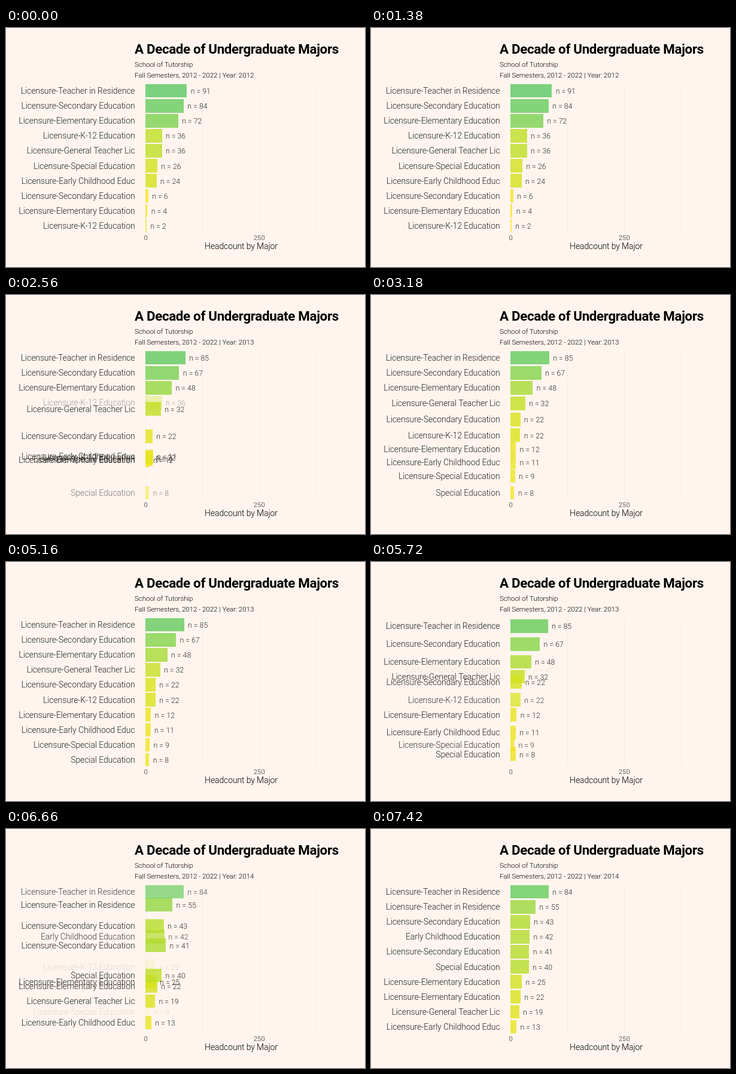
An HTML page with a canvas for the animation above (8 s loop, 600 by 400 pixels).

```html
<!DOCTYPE html>
<html lang="en">
<head>
<meta charset="utf-8">
<title>A Decade of Undergraduate Majors</title>
<style>
  html, body { margin: 0; width: 100%; height: 100%; overflow: hidden; background: #fff5ee; }
  canvas { display: block; }
</style>
</head>
<body>
<canvas id="stage" width="600" height="400"></canvas>
<script>
const ctx = document.getElementById('stage').getContext('2d');

const LOOP = 8000;
const MOVE = 2440;
const STARTS = [1265, 5025];
const YEARS = [2012, 2013, 2014];

// Each major: label, then [rank, headcount] per year, or null when it is not ranked.
const MAJORS = [
  ['Licensure-Teacher in Residence', [1, 91], [1, 85], [2, 55]],
  ['Licensure-Secondary Education', [2, 84], [2, 67], [5, 41]],
  ['Licensure-Elementary Education', [3, 72], [3, 48], [8, 22]],
  ['Licensure-K-12 Education', [4, 36], null, null],
  ['Licensure-General Teacher Lic', [5, 36], [4, 32], [9, 19]],
  ['Licensure-Special Education', [6, 26], [9, 9], null],
  ['Licensure-Early Childhood Educ', [7, 24], [8, 11], [10, 13]],
  ['Licensure-Secondary Education', [8, 6], [5, 22], [3, 43]],
  ['Licensure-Elementary Education', [9, 4], [7, 12], [7, 25]],
  ['Licensure-K-12 Education', [10, 2], [6, 22], null],
  ['Special Education', null, [10, 8], [6, 40]],
  ['Licensure-Teacher in Residence', null, null, [1, 84]],
  ['Early Childhood Education', null, null, [4, 42]],
];

// Yellow to green end of the viridis scale.
const COLORS = [
  [253, 231, 37], [220, 227, 25], [184, 222, 41],
  [149, 216, 64], [115, 208, 85], [85, 198, 103],
];

const lerp = (a, b, t) => a + (b - a) * t;
const clamp = (v, lo, hi) => Math.min(hi, Math.max(lo, v));
const easeCubic = t => t < 0.5 ? 4 * t ** 3 : 1 - 4 * (1 - t) ** 3;
const xOf = count => 233.35 + count * 0.758;
const yOf = rank => 105.15 + (rank - 1) * 25.1;

function colorOf(count) {
  const pos = clamp((count - 2) / 18.5, 0, 4.999);
  const i = Math.floor(pos);
  return `rgb(${COLORS[i].map((c, k) => Math.round(lerp(c, COLORS[i + 1][k], pos - i)))})`;
}

function text(string, x, y, { size, weight = 300, color = '#000', align = 'left', spacing = -0.12 }) {
  ctx.font = `${weight} ${size}px Roboto, "Liberation Sans", sans-serif`;
  ctx.letterSpacing = spacing + 'px';
  ctx.textAlign = align;
  ctx.fillStyle = color;
  ctx.fillText(string, x, y);
}

// Bar edges fall on whole pixels.
function bar(y, count) {
  const left = Math.round(xOf(0)), top = Math.round(y - 11.3);
  ctx.fillStyle = colorOf(count);
  ctx.fillRect(left, top, Math.round(xOf(count)) - left, Math.round(y + 11.3) - top);
}

function drawFrame(year) {
  ctx.globalAlpha = 1;
  ctx.fillStyle = '#fff5ee';
  ctx.fillRect(0, 0, 600, 400);
  ctx.fillStyle = '#ededeb';
  for (let count = 0; count <= 375; count += 125) {
    ctx.fillRect(Math.round(xOf(count)), 94, 1, 248);
  }
  text('A Decade of Undergraduate Majors', 215, 43, { size: 22.4, weight: 700, spacing: -0.36 });
  text('School of Tutorship', 215, 65, { size: 11.7 });
  text(`Fall Semesters, 2012 - 2022 | Year: ${year}`, 215, 83, { size: 11.7 });
  for (const count of [0, 250]) {
    text(count, xOf(count) + 0.4, 355, { size: 11.3, weight: 400, color: '#666', align: 'center', spacing: 0 });
  }
  text('Headcount by Major', 393, 370, { size: 14, align: 'center' });
}

function drawMajors(step, t) {
  const eased = easeCubic(t);
  const majors = [];
  for (const [label, ...states] of MAJORS) {
    const from = states[step], to = states[step + 1];
    if (!from && !to) continue;
    const a = from || to, b = to || from;
    majors.push({
      label,
      y: yOf(lerp(a[0], b[0], eased)),
      count: lerp(a[1], b[1], eased),
      shown: t < 0.5 ? a[1] : b[1],
      alpha: lerp(from ? 1 : 0, to ? 1 : 0, eased),
    });
  }
  for (const { y, count, alpha } of majors) {
    ctx.globalAlpha = alpha * 0.8;
    bar(y, count);
  }
  for (const { label, y, count, shown, alpha } of majors) {
    ctx.globalAlpha = alpha;
    text(label, 215.5, y + 4.9, { size: 14, color: '#222', align: 'right', spacing: -0.1 });
    text(`n = ${shown}`, xOf(count) + 6.3, y + 4.9, { size: 12.3, color: '#2a2a2a', spacing: 0 });
  }
}

function render() {
  const now = performance.now() % LOOP;
  const step = now < STARTS[1] ? 0 : 1;
  const t = clamp((now - STARTS[step]) / MOVE, 0, 1);
  drawFrame(YEARS[t < 0.5 ? step : step + 1]);
  drawMajors(step, t);
  requestAnimationFrame(render);
}
render();
</script>
</body>
</html>
```
